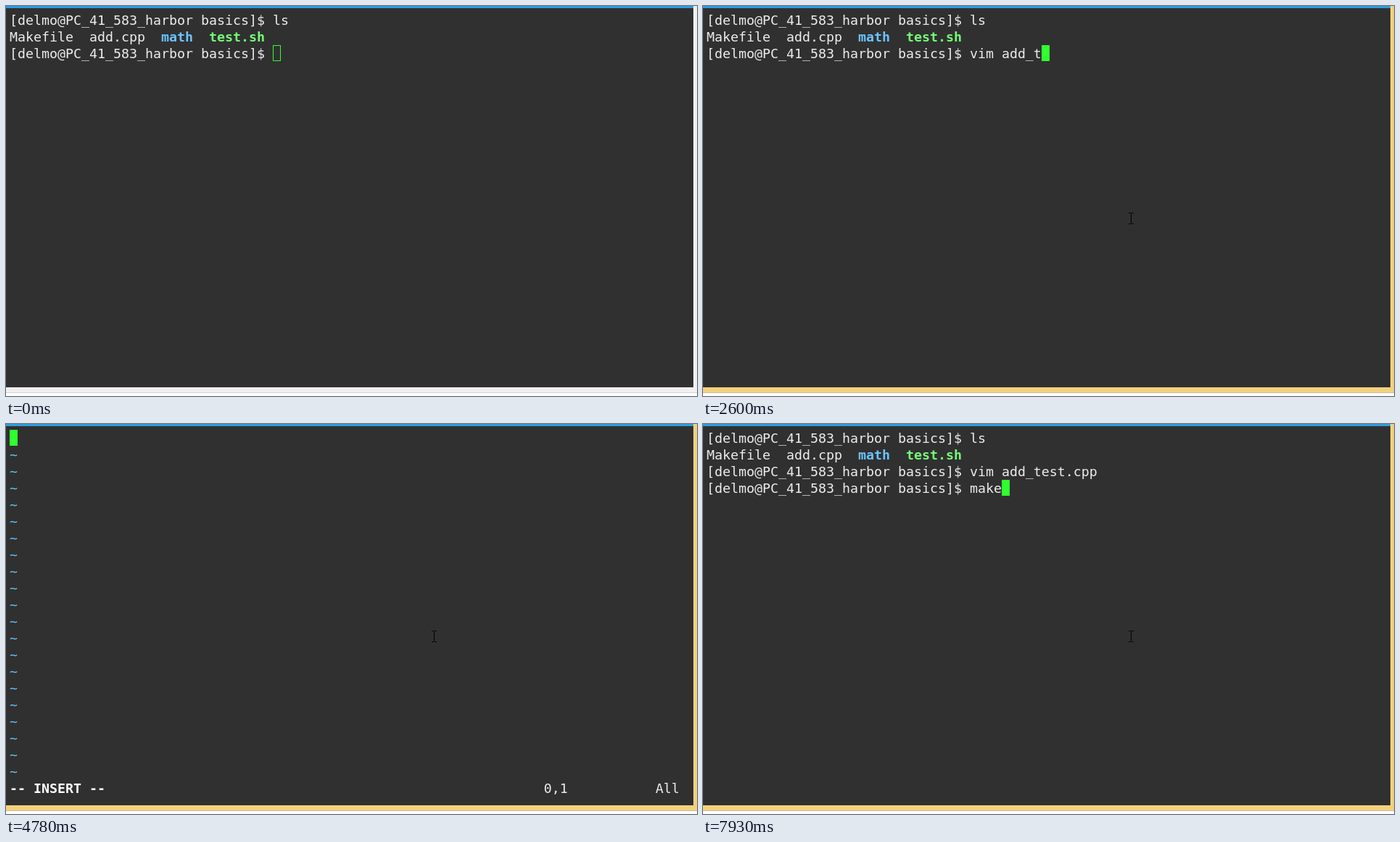
Animation, 953 px wide and 538 px high, one loop 8 s. Source, as an HTML page:

```html
<!DOCTYPE html>
<html lang="en">
<head>
<meta charset="utf-8">
<title>Terminal session</title>
<style>
  html, body { margin: 0; width: 100%; height: 100%; overflow: hidden; background: #fff; }
  #stage { position: relative; width: 953px; height: 538px; overflow: hidden; }
  #stage > div, #pointer { position: absolute; }
  #frame { left: 0; top: 0; width: 953px; height: 533px; background: #f0f0f0; border-bottom: 1px solid #d4d4d4; }
  .focused #frame { background: #f3d07c; border-bottom-color: #c9bfa8; }
  #window { left: 0; top: 0; width: 948px; height: 523px; background: #303030; border-top: 3px solid #2f9ae0; }
  #cursor { width: 11px; height: 22px; box-sizing: border-box; border: 1px solid #30ff30; }
  #cursor.solid { background: #30ff30; }
  #text {
    left: 5px; top: 8px; color: #ececec; white-space: pre;
    font: 18.27px/23px "DejaVu Sans Mono", monospace;
  }
  #text div { height: 23px; }
  .dir { color: #6cc4ff; font-weight: bold; }
  .exe { color: #74ff74; font-weight: bold; }
  .mode { color: #fff; font-weight: bold; }
  .tilde { color: #60c4ff; }
  .pre { color: #cc33cc; }
  .const { color: #cc3333; }
  .type { color: #338033; }
  .stmt { color: #c08030; }
  .match { display: inline-block; height: 22px; line-height: 23px; vertical-align: top; background: #80ffff; }
  .plain-match { color: #ececec; }
</style>
</head>
<body>
<div id="stage">
  <div id="frame"></div>
  <div id="window"></div>
  <div id="cursor"></div>
  <div id="text"></div>
  <svg id="pointer" width="7" height="16" viewBox="0 0 7 16" shape-rendering="crispEdges">
    <path d="M0 .5H3M4 .5H7M3.5 1V15M0 15.5H3M4 15.5H7" stroke="#000" fill="none"/>
  </svg>
</div>
<script>
const LOOP = 8000, CELL_W = 11, CELL_H = 23, LEFT = 5, TOP = 8;
const PROMPT = "[delmo@PC_41_583_harbor basics]$ ";
const COMMAND = "vim add_test.cpp";
const $ = id => document.getElementById(id);

// A line is a list of parts; a part is a string or [class, string].
const listing = [
  [PROMPT + "ls"],
  ["Makefile  add.cpp  ", ["dir", "math"], "  ", ["exe", "test.sh"]]
];

const code = cursorOnBrace => [
  [["pre", "#include "], ["const", "<iostream>"]],
  [["pre", "#include "], ["const", "<cassert>"]],
  [["pre", "#include "], ["const", '"math/add.h"']],
  [],
  [["type", "int"], " main()", ["match", "{"]],
  ["  assert(add(", ["const", "1"], ",", ["const", "1"], ")==", ["const", "3"], ");"],
  ["  ", ["stmt", "return"], " ", ["const", "0"], ";"],
  [cursorOnBrace ? "}" : ["match", "}"]]
];

const shell = (...commands) => {
  const last = commands[commands.length - 1];
  return {
    lines: [...listing, ...commands.map(c => [PROMPT + c])],
    cursor: [PROMPT.length + last.length, commands.length + 1]
  };
};

const editor = (body, status, cursor) => ({
  lines: [...body, ...Array(21 - body.length).fill([["tilde", "~"]]), status],
  cursor
});

const ruler = (width, position) => [" ".repeat(67 - width) + position.padEnd(14) + "All"];
const insertStatus = position => [["mode", "-- INSERT --"], ...ruler(12, position)];
const fileName = '"add_test.cpp"', newFile = fileName + " [New File]";

const typed = (times, counts, view) => times.map((t, i) => [t, view(counts[i])]);

const steps = [
  [0, shell("")],
  ...typed(
    [1330, 1430, 1530, 1630, 1720, 1960, 2110, 2370, 2600, 2730, 2820, 3040, 3200, 3300, 3450],
    [1, 2, 3, 4, 5, 6, 7, 8, 9, 10, 12, 13, 14, 15, 16],
    n => shell(COMMAND.slice(0, n))),
  [3950, { lines: shell(COMMAND).lines, cursor: [0, 3] }],
  [4500, editor([[]], [newFile, ...ruler(newFile.length, "0,0-1")], [0, 0])],
  [4780, editor([[]], insertStatus("0,1"), [0, 0])],
  [5560, editor(code(false), insertStatus("8,2"), [1, 7])],
  [6280, editor(code(true), [], [0, 7])],
  ...typed([6650, 6820, 6900], [1, 2, 3],
    n => editor(code(false), [":wq".slice(0, n)], [n, 21])),
  [7050, editor(code(false), [fileName], null)],
  ...typed([7160, 7610, 7700, 7850, 7930], [0, 1, 2, 3, 4],
    n => shell(COMMAND, "make".slice(0, n)))
];

const pointerSteps = [[0, null], [70, [608, 308]], [390, [602, 302]], [470, [594, 291]], [560, [587, 285]]];
const FOCUS_AT = 560, SOLID_AT = 640;

const current = (table, t) => table.filter(([at]) => at <= t).pop()[1];

function place(element, position) {
  element.style.display = position ? "block" : "none";
  if (position) {
    element.style.left = position[0] + "px";
    element.style.top = position[1] + "px";
  }
}

function makeLine(parts) {
  const line = document.createElement("div");
  for (const part of parts) {
    if (typeof part === "string") {
      line.append(part);
    } else {
      const span = document.createElement("span");
      [span.className, span.textContent] = part;
      line.append(span);
    }
  }
  return line;
}

let shown = null;
function draw(t) {
  const view = current(steps, t);
  if (view !== shown) {
    shown = view;
    $("text").replaceChildren(...view.lines.map(makeLine));
    place($("cursor"), view.cursor &&
      [LEFT + view.cursor[0] * CELL_W, TOP + view.cursor[1] * CELL_H]);
  }
  $("stage").classList.toggle("focused", t >= FOCUS_AT);
  $("cursor").classList.toggle("solid", t >= SOLID_AT);
  place($("pointer"), current(pointerSteps, t));
}

const start = performance.now();
function tick() {
  draw((performance.now() - start) % LOOP);
  requestAnimationFrame(tick);
}
tick();
</script>
</body>
</html>
```
